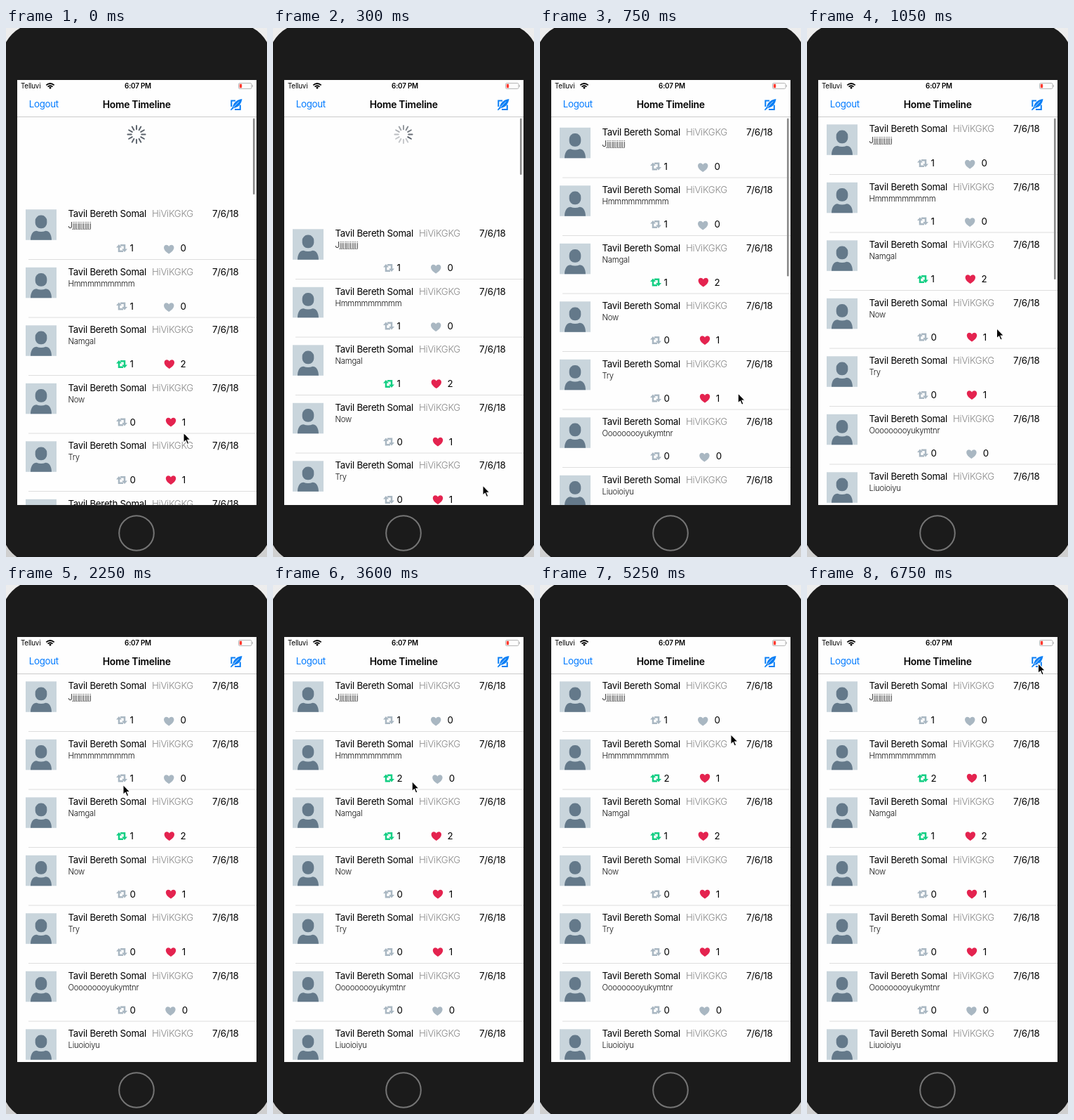
Recreate the animation shown at these times as an HTML page. Size 372 px wide and 753 px high, loop 8000 ms.

```html
<!DOCTYPE html>
<html lang="en">
<head>
<meta charset="utf-8">
<title>Home Timeline</title>
<style>
  html, body { margin: 0; width: 100%; height: 100%; overflow: hidden; background: linear-gradient(#ededed, #cfcfcf); }
  svg { display: block; width: 372px; height: 753px; }
  text { font: 400 13.3px Inter, "Liberation Sans", sans-serif; letter-spacing: -.02em; fill: #000; }
  .handle { font-weight: 300; fill: #8a8a8a; }
  .body { font-size: 11.3px; font-weight: 300; fill: #111; }
  .status { font-size: 9.8px; }
  .clock { font-weight: 600; text-anchor: middle; }
  .title { font-size: 13.9px; font-weight: 600; text-anchor: middle; }
  .link { fill: #007aff; }
</style>
</head>
<body>
<svg viewBox="0 0 372 753">
  <defs>
    <clipPath id="listClip"><rect x="16" y="127" width="341" height="552"/></clipPath>
    <clipPath id="spinClip"><rect id="gap" x="170" y="127" width="32"/></clipPath>
    <g id="avatar">
      <rect width="44" height="43.5" fill="#c9d5dc"/>
      <rect x="13.700" y="8.300" width="16.600" height="18.600" rx="7.800" fill="#64798a"/>
      <path d="M7 43.500C7 35 11 30.500 15.500 30.500Q22 33 28.500 30.500C33 30.500 37 35 37 43.500Z" fill="#64798a"/>
    </g>
    <g id="share">
      <path d="M4 3V9.700H10M12 8V1.300H6" fill="none" stroke="currentColor" stroke-width="2.500"/>
      <path d="M0 4.600L4 0L8 4.600ZM8 6.400L12 11L16 6.400Z" fill="currentColor"/>
    </g>
    <path id="heart" d="M0 6.600C-4 4-7.200 1-7.200-2.500C-7.200-7-1.800-7.600 0-4C1.800-7.600 7.200-7 7.200-2.500C7.200 1 4 4 0 6.600Z" fill="currentColor"/>
  </defs>

  <rect x="-6" y="-6" width="384" height="768" rx="50" fill="#1b1b1b"/>
  <circle cx="186" cy="719" r="24.800" fill="none" stroke="#757575" stroke-width="2"/>
  <rect x="16" y="74" width="341" height="605" fill="#fefefe"/>

  <g clip-path="url(#listClip)">
    <g id="list"></g>
    <g clip-path="url(#spinClip)">
      <g id="spinner" stroke="#596069" stroke-width="1.900" stroke-linecap="round"></g>
    </g>
    <rect id="bar" x="352" y="128.500" width="2.600" rx="1.300" fill="#8c8c8c"/>
  </g>

  <text class="status" x="21" y="86.300">Telluvi</text>
  <path d="M57.300 81.400Q63 76.600 68.700 81.400M59.500 83.700Q63 80.800 66.500 83.700" fill="none" stroke="#000" stroke-width="1.700"/>
  <path d="M61.200 85L63 83.600L64.800 85L63 86.900Z"/>
  <text class="status clock" x="188" y="86.300">6:07 PM</text>
  <rect x="331.500" y="78.500" width="18.500" height="8" rx="1.800" fill="none" stroke="#b5b5b5"/>
  <rect x="332.800" y="79.800" width="3.400" height="5.400" rx=".6" fill="#ff3b30"/>
  <path d="M351.200 81V84" stroke="#b5b5b5" stroke-width="1.200"/>
  <text class="link" x="32.700" y="113.400">Logout</text>
  <text class="title" x="186.200" y="113.500">Home Timeline</text>
  <path d="M327 103.500H321.300V112M326 116H333.800V109.500" fill="none" stroke="#0a7ff5" stroke-width="2"/>
  <path d="M336.500 101C329.500 101.500 324 106.500 323.300 112L319.800 116.500L321 117.300L324.800 113.700C331 113.500 335.500 108 336.500 101Z" fill="#0a7ff5"/>
  <path d="M324 113L332 104.800" stroke="#fefefe" stroke-width=".7"/>
  <path d="M16 126.500H357" stroke="#cbcbcb"/>

  <path id="cursor" d="M0 0V14.200L3.200 11.300L5.400 16.500L7.800 15.500L5.600 10.400H10Z" stroke="#fff" stroke-width="1.100"/>
</svg>

<script>
const LOOP = 8000, STEP = 150, PITCH = 82.5;
const RELEASE = 300, SHARE_TAP = 3150, LIKE_TAP = 4650;
const GREY = '#a9b7c2', GREEN = '#13ce83', RED = '#e4234f';
const $ = id => document.getElementById(id);
const clamp = v => Math.min(1, Math.max(0, v));
const easeOut = p => 1 - (1 - clamp(p)) ** 3;

const posts = [
  { text: 'Jjjjjjjjjjjj', shares: 1, likes: 0 },
  { text: 'Hmmmmmmmmm', shares: 1, likes: 0 },
  { text: 'Namgal', shares: 1, likes: 2, shared: true, liked: true },
  { text: 'Now', shares: 0, likes: 1, liked: true },
  { text: 'Try', shares: 0, likes: 1, liked: true },
  { text: 'Ooooooooyukymtnr', shares: 0, likes: 0 },
  { text: 'Liuoioiyu', shares: 0, likes: 0 }
];

// Each move eases the pointer from where it rests to a new place.
const start = { x: 253, y: 576 };
const moves = [
  { from: 0, to: 300, x: 299, y: 651 },
  { from: 600, to: 1200, x: 270, y: 424 },
  { from: 1350, to: 1650, x: 210, y: 361 },
  { from: 1800, to: 2550, x: 164, y: 279 },
  { from: 3450, to: 4200, x: 234, y: 280 },
  { from: 5100, to: 6000, x: 324, y: 120 },
  { from: 6300, to: 6750, x: 329.5, y: 111.5 }
];

function pointerAt(t) {
  return moves.reduce((pos, move) => {
    const p = easeOut((t - move.from) / (move.to - move.from));
    return { x: pos.x + (move.x - pos.x) * p, y: pos.y + (move.y - pos.y) * p };
  }, start);
}

// The list is pulled down, then springs back in half-pixel steps.
function listOffset(t) {
  const pulled = 121 + 28 * easeOut(t / RELEASE);
  const left = Math.exp(-Math.max(0, t - RELEASE) / 130);
  return Math.floor(pulled * left * 2) / 2;
}

function rowMarkup({ text, shares, likes, shared, liked }, i) {
  const shift = shares === 1 ? 0 : 2.2;
  const heartX = 232.2 + shift + (liked ? .6 : 0);
  return `<g transform="translate(0 ${i * PITCH})">
    <use href="#avatar" x="28" y="137.3"/>
    <text x="88.500" y="148">Tavil Bereth Somal</text>
    <text class="handle" x="208" y="148">HiViKGKG</text>
    <text x="294" y="148">7/6/18</text>
    <text class="body" x="88.500" y="164.200">${text}</text>
    <use href="#share" x="157" y="187" color="${shared ? GREEN : GREY}"/>
    <text x="176.500" y="197">${shares}</text>
    <use href="#heart" x="${heartX}" y="${liked ? 192.5 : 194}" color="${liked ? RED : GREY}"/>
    <text x="${248.6 + shift}" y="197">${likes}</text>
    <path d="M32 208.500H357" stroke="#dedede"/>
  </g>`;
}

$('spinner').innerHTML = Array.from({ length: 12 }, (_, i) =>
  `<path d="M186 144.300V138.900" transform="rotate(${i * 30} 186 151.500)"/>`).join('');
const ticks = [...$('spinner').children];

let shownMarkup = '';
function drawList(t) {
  const shared = t >= SHARE_TAP, liked = t >= LIKE_TAP;
  Object.assign(posts[1], { shared, liked, shares: 1 + shared, likes: Number(liked) });
  const markup = posts.map(rowMarkup).join('');
  if (markup !== shownMarkup) $('list').innerHTML = shownMarkup = markup;
}

function drawSpinner(t, offset) {
  const head = t / 30 + 6;
  $('gap').setAttribute('height', offset + 12);
  $('spinner').setAttribute('opacity', clamp((offset - 4.5) / 10));
  ticks.forEach((tick, i) =>
    tick.setAttribute('opacity', t < RELEASE ? 1 : Math.max(.35, 1 - (head - i + 12) % 12 * .085)));
}

function draw(t) {
  const offset = listOffset(t);
  const { x, y } = pointerAt(t);
  drawList(t);
  drawSpinner(t, offset);
  $('list').setAttribute('transform', `translate(0 ${offset})`);
  $('bar').setAttribute('height', t < 1200 ? 229.5 - offset : 0);
  $('cursor').setAttribute('transform', `translate(${x} ${y})`);
}

function tick() {
  const t = performance.now() % LOOP;
  draw(Math.floor(t / STEP) * STEP);
  requestAnimationFrame(tick);
}
tick();
</script>
</body>
</html>
```
